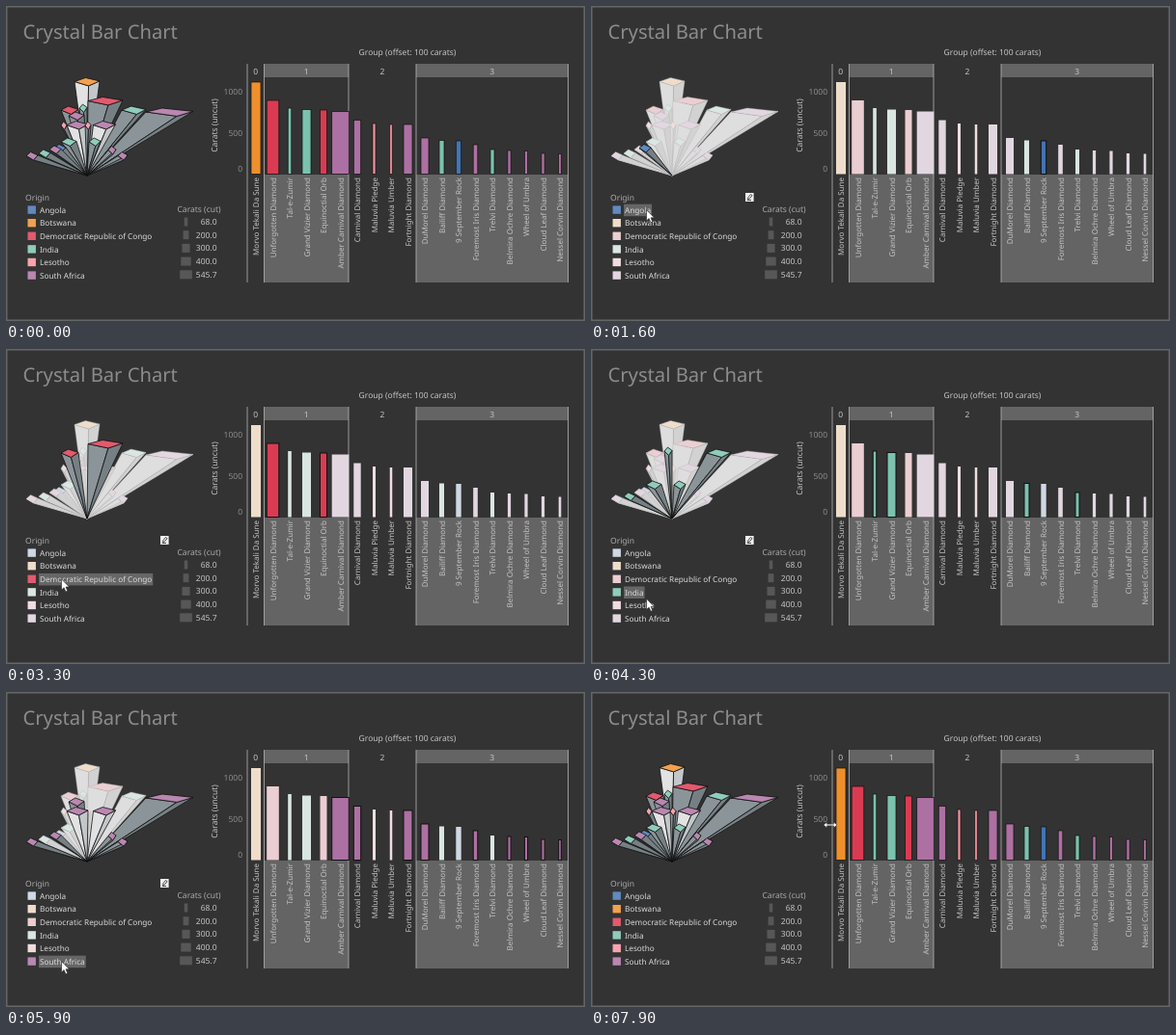
These frames come from a looping animation (600 by 327 pixels, 8 s). An HTML page:

```html
<!DOCTYPE html>
<html lang="en">
<head>
<meta charset="utf-8">
<title>Crystal Bar Chart</title>
<style>
  html, body { margin: 0; width: 100%; height: 100%; overflow: hidden; background: #333; }
  svg { display: block; width: 600px; height: 327px; }
  text { font-family: "Noto Sans", "Open Sans", sans-serif; font-size: 8.5px; fill: #c4c4c4; text-rendering: geometricPrecision; }
  polygon { stroke-linejoin: round; }
</style>
</head>
<body>
<svg viewBox="0 0 600 327"></svg>
<script>
const svg = document.querySelector('svg');
const LOOP = 8000, STEP = 100, BASE = 174.5;

function set(el, attrs) {
  for (const k in attrs) el.setAttribute(k, attrs[k]);
}
function add(tag, attrs, parent = svg) {
  const el = document.createElementNS('http://www.w3.org/2000/svg', tag);
  set(el, attrs);
  parent.append(el);
  return el;
}
function rect(x, y, width, height, fill, more) {
  return add('rect', { x, y, width, height, fill, ...more });
}
function label(str, x, y, more) {
  const el = add('text', { x, y, ...more });
  el.textContent = str;
  return el;
}
function mix(hex, target, amount) {
  const part = (h, i) => parseInt(h.slice(i, i + 2), 16);
  return 'rgb(' + [1, 3, 5].map(i =>
    Math.round(part(hex, i) * (1 - amount) + part(target, i) * amount)) + ')';
}
const rowY = i => 211.7 + 13.6 * i;

const origins = ['Angola', 'Botswana', 'Democratic Republic of Congo', 'India', 'Lesotho', 'South Africa'];
const colors = ['#4274b4', '#ef8f2c', '#db3b52', '#7bc2ae', '#f6929f', '#ad70a2'];
const pale = colors.map(c => mix(c, '#eeeeee', .82));
const soft = colors.map(c => mix(c, '#ffffff', .16));

// name, origin, bar width, bar top
const stones = [
  ['Morvo Tekali Da Sune', 1, 10, 79], ['Unforgotten Diamond', 2, 12.6, 98],
  ['Tal-e-Zumir', 3, 3.6, 106], ['Grand Vizier Diamond', 3, 9, 107.5],
  ['Equinoctial Orb', 2, 7, 108], ['Amber Carnival Diamond', 5, 17.6, 109.5],
  ['Carnival Diamond', 5, 7.4, 118.5], ['Maluvia Pledge', 4, 3, 122],
  ['Maluvia Umber', 4, 2.5, 123], ['Fortnight Diamond', 5, 9, 123],
  ['DuMorel Diamond', 5, 8, 137], ['Bailiff Diamond', 3, 5, 139.5],
  ['9 September Rock', 0, 5.4, 140], ['Foremost Iris Diamond', 5, 4.6, 144],
  ['Trelvi Diamond', 3, 4, 149], ['Belmira Ochre Diamond', 5, 3.2, 150],
  ['Wheel of Umbra', 5, 3.2, 150.5], ['Cloud Leaf Diamond', 5, 3.2, 153],
  ['Nessel Corvin Diamond', 5, 2.6, 153.5]
];

// origin, centre of the top, its half width, bright side faces
const tops = [
  [1, 84, 78.5, 13, true], [5, 169.5, 110, 24.5], [3, 132.5, 108, 12.5],
  [2, 103, 98.5, 18], [2, 66, 108, 9], [3, 80, 106, 4], [5, 73, 114, 8],
  [4, 60, 124, 3], [5, 74, 123.5, 11, true], [5, 102, 123.5, 11.5, true],
  [4, 85, 124, 3], [3, 65, 141, 8], [3, 92, 141, 6], [0, 56, 147.5, 6],
  [5, 51, 149, 6], [3, 40, 153, 6], [5, 27, 155.5, 6], [5, 110, 149.5, 4],
  [5, 121, 155.5, 5]
];

// Frame and titles
rect(.75, .75, 598.5, 325.5, '#333', { stroke: '#666', 'stroke-width': 1.5 });
label('Crystal Bar Chart', 17.5, 34, { style: 'font-size:20.2px;fill:#8c8c8c' });
label('Group (offset: 100 carats)', 416, 51, { 'text-anchor': 'middle' });
label('Carats (uncut)', 0, 0, { transform: 'translate(218.5 124) rotate(-90)', 'text-anchor': 'middle' });
[[1000, 92], [500, 135], [0, 172]].forEach(([n, y]) =>
  label(n, 245, y, { 'text-anchor': 'end', style: 'fill:#8c8c8c' }));

// Group panes
const edges = [250, 267.5, 355, 425, 582.5];
for (let g = 0; g < 4; g++) {
  const x = edges[g], w = edges[g + 1] - x;
  if (g % 2) {
    rect(x, 60, w, 14, '#646464');
    rect(x, 175, w, 112, '#646464');
  }
  label(g, x + w / 2, 71, { 'text-anchor': 'middle' });
}
for (const x of edges) rect(x - .4, 60, .8, 227, '#b5b5b5');

// Bars and their names
const bars = stones.map(([name, origin, w, top], i) => {
  const x = 259 + 17.5 * i;
  label(name, 0, 0, {
    transform: `translate(${x + 3} 178) rotate(-90)`, 'text-anchor': 'end', style: 'font-size:8px'
  });
  return { origin, el: rect(x - w / 2, top, w, BASE - top, colors[origin]) };
});

// Origin legend
label('Origin', 20, 201.5, { style: 'fill:#aaa' });
const items = origins.map((name, i) => {
  const y = rowY(i);
  const back = rect(34, y - 6, 0, 12.5, '#666');
  const swatch = rect(22.5, y - 4.3, 8.4, 8.4, soft[i]);
  const text = label(name, 35, y + 3, { style: 'font-size:8.2px;fill:#dadada' });
  back.setAttribute('width', text.getComputedTextLength() + 2);
  return { back, swatch };
});

// Size legend
label('Carats (cut)', 177.5, 214, { style: 'fill:#aaa' });
['68.0', '200.0', '300.0', '400.0', '545.7'].forEach((n, i) => {
  const y = 224 + 13.7 * i, w = 3.5 + 2.3 * i;
  rect(186.5 - w / 2, y - 4.5, w, 9, '#575757');
  label(n, 218.5, y + 3, { 'text-anchor': 'end' });
});

// Crystals: two side faces meeting at the root, then the top
const cluster = add('g', {});
const crystals = tops.map(([origin, x, y, w, bright]) => {
  const g = add('g', {}, cluster);
  const skew = w * (.12 + Math.abs(x - 84) / 450);
  const left = [x - w, y], right = [x + w, y - .6], root = [84, 176];
  const far = [x - skew, y - 4], near = [x + skew, y + 4.4];
  const faces = [[left, near, root], [near, right, root], [left, far, right, near]]
    .map(pts => add('polygon', { points: pts.join(' ') }, g));
  return { origin, bright, g, faces };
});

// Edit icon and pointers
const icon = add('g', {});
add('rect', { x: 160, y: 194, width: 8.6, height: 9, fill: '#f2f2f2' }, icon);
add('path', { d: 'M162.5 200.5L163 198.5L165.5 195.5L167 196.7L164.5 199.8ZM162 201.5H166', fill: 'none', stroke: '#222', 'stroke-width': .8 }, icon);
const arrow = add('path', { d: 'M0 0V11.2L2.6 8.8L4.4 13L6.3 12.2L4.5 8.1H8Z', fill: '#fff', stroke: '#222', 'stroke-width': .6 });
const resizer = add('path', {
  d: 'M-7 0L-3.5 -2.8V-.8H3.5V-2.8L7 0L3.5 2.8V.8H-3.5V2.8Z', fill: '#fff', stroke: '#222', 'stroke-width': .4
});

// Pointer moves, as start and end: in, down the legend row by row, out to the axis
const moves = [[600, 1100], [1700, 2100], [2400, 2900], [3400, 3800], [4000, 4600], [4800, 5300], [7000, 7900]];
const stops = [[12, 246], ...origins.map((_, i) => [57.5, rowY(i)]), [248, 138]];
const switches = [1600, 2400, 3200, 4000, 4900, 5600, 6700];

function pointer(t) {
  const done = moves.reduce((sum, [a, b]) =>
    sum + Math.min(1, Math.max(0, (t - a) / (b - a))), 0);
  const i = Math.min(moves.length - 1, Math.floor(done)), k = done - i;
  return stops[i].map((v, n) => v + (stops[i + 1][n] - v) * k);
}

// Index of the lit origin, or -1 for none
function active(t, lag) {
  const i = switches.filter((s, n) => t >= s + (n > 0 && n < 6 ? lag : 0)).length - 1;
  return i < 6 ? i : -1;
}

function showLegend(lit) {
  items.forEach(({ back, swatch }, i) => {
    set(back, { visibility: i === lit ? 'visible' : 'hidden' });
    set(swatch, { fill: lit < 0 || i === lit ? soft[i] : pale[i] });
  });
  const isOn = c => lit < 0 || c.origin === lit;
  for (const c of crystals) {
    const on = isOn(c);
    const sides = !on ? ['#dedede', '#d2d2d2']
      : c.bright ? ['#e2e2e2', '#c3c7c9'] : ['#8b9599', '#768084'];
    const fills = [...sides, (on ? soft : pale)[c.origin]];
    c.faces.forEach((f, i) => set(f, {
      fill: fills[i], stroke: on ? '#111' : '#b9b9b9', 'stroke-width': on ? .8 : .4
    }));
  }
  // Lit crystals stand in front
  cluster.append(...[...crystals].sort((a, b) => isOn(a) - isOn(b)).map(c => c.g));
}

function showBars(lit) {
  for (const { origin, el } of bars) {
    const on = lit < 0 || origin === lit;
    set(el, {
      fill: (on ? colors : pale)[origin],
      stroke: on ? '#111' : 'none', 'stroke-width': lit < 0 ? .7 : 1
    });
  }
}

const show = (el, on) => set(el, { visibility: on ? 'visible' : 'hidden' });
let last = -1;
function draw(now) {
  const t = Math.floor(now % LOOP / STEP) * STEP;
  if (t !== last) {
    last = t;
    showLegend(active(t, 0));
    showBars(active(t, 100));
    const transform = `translate(${pointer(t).join(' ')})`;
    set(arrow, { transform });
    set(resizer, { transform });
    show(icon, t >= 800 && t < 7500);
    show(arrow, t >= 600 && t < 7900);
    show(resizer, t >= 7900);
  }
  requestAnimationFrame(draw);
}
draw(0);
</script>
</body>
</html>
```
